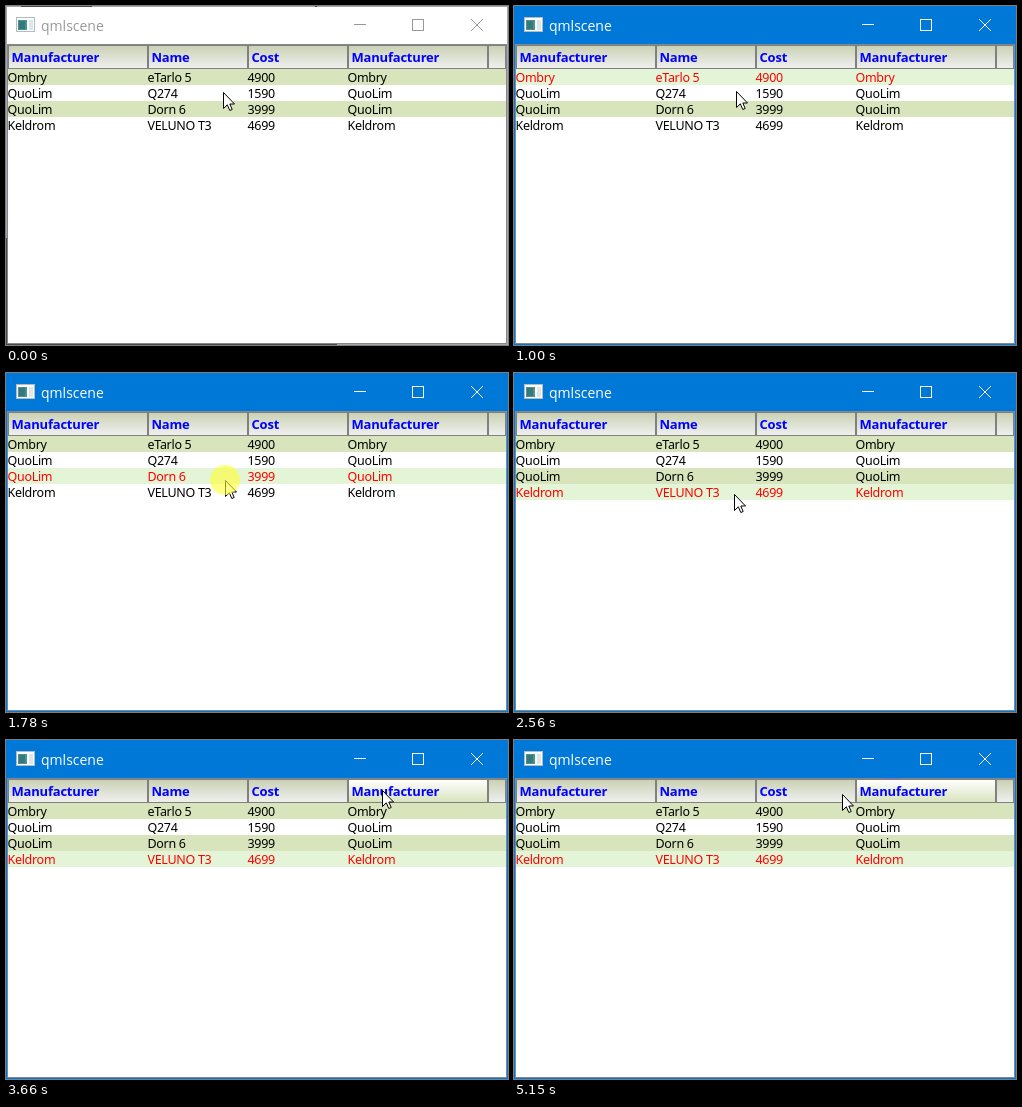
Write an HTML page that moves like this. It is 502 px wide and 339 px high and loops after 5.22 s.

```html
<!DOCTYPE html>
<html lang="en">
<head>
<meta charset="utf-8">
<title>qmlscene</title>
<style>
  html, body { margin: 0; width: 100%; height: 100%; overflow: hidden; background: #fff; }
  svg { display: block; width: 502px; height: 339px; }
  text { white-space: pre; }
  .title { font: 14px "Open Sans", "Noto Sans", sans-serif; }
  .head { font: bold 13px "Noto Sans", "Open Sans", sans-serif; letter-spacing: -.2px; }
  .cell { font: 12.5px "Noto Sans", "Open Sans", sans-serif; letter-spacing: -.3px; }
</style>
</head>
<body>
<svg id="stage" viewBox="0 0 502 339" xmlns="http://www.w3.org/2000/svg">
  <defs>
    <linearGradient id="normal" x2="0" y2="1">
      <stop stop-color="#c9d1b3"/><stop offset="1" stop-color="#f0f0f0"/>
    </linearGradient>
    <linearGradient id="hover" x2="0" y2="1">
      <stop stop-color="#fff"/><stop offset="1" stop-color="#d7e3bc"/>
    </linearGradient>
    <linearGradient id="pressed" x2="0" y2="1">
      <stop stop-color="#d3d8c0"/><stop offset="1" stop-color="#fff"/>
    </linearGradient>
  </defs>
  <rect id="frame" width="502" height="339"/>
  <g id="backdrop" shape-rendering="crispEdges" fill="#4b4543">
    <rect x="15" width="71" height="1"/>
    <rect x="309" width="2" height="1"/>
    <rect y="232" width="1" height="107"/>
    <rect y="338" width="331" height="1"/>
  </g>
  <rect id="bar" x="1" y="1" width="500" height="37"/>
  <g id="icon" shape-rendering="crispEdges">
    <rect x="10" y="11" width="19" height="15" fill="#b4bcc2"/>
    <rect x="11" y="12" width="17" height="13" fill="#fbfcfc"/>
    <rect x="12" y="14" width="9" height="10" fill="#4a9490"/>
    <rect x="13" y="15" width="6" height="8" fill="#37787c"/>
    <rect x="23" y="14" width="4" height="10" fill="#dfe6ea"/>
  </g>
  <text id="caption" class="title" x="35" y="25">qmlscene</text>
  <g id="buttons" fill="none">
    <path d="M348 18.5h12M406.5 13.5h11v11h-11z" shape-rendering="crispEdges"/>
    <path d="M465 13l12 12M477 13l-12 12"/>
  </g>
  <rect x="1.5" y="38.5" width="499" height="299" fill="#fff" stroke="#828790" shape-rendering="crispEdges"/>
  <g id="table"></g>
  <path id="trace" d="M368 38.5h20" stroke="#8b6fc0" shape-rendering="crispEdges"/>
  <path id="cursor" d="M.5.5V16.5L4.3 12.8L6.8 18.5L9.2 17.5L6.8 12H11.5Z" fill="#fff" stroke="#000" stroke-width="1"/>
  <circle id="spot" r="15" fill="#ffff30" fill-opacity=".6"/>
</svg>
<script>
const LOOP = 5220;
const $ = id => document.getElementById(id);
const set = (el, attrs) => {
  for (const name in attrs) el.setAttribute(name, attrs[name]);
};
const add = (tag, attrs, label) => {
  const el = document.createElementNS("http://www.w3.org/2000/svg", tag);
  set(el, attrs);
  if (label) el.textContent = label;
  return $("table").appendChild(el);
};

const columns = [2, 142, 242, 342, 482, 500];
const titles = ["Manufacturer", "Name", "Cost", "Manufacturer", ""];
const phones = [
  ["Ombry", "eTarlo 5", "4900"],
  ["QuoLim", "Q274", "1590"],
  ["QuoLim", "Dorn 6", "3999"],
  ["Keldrom", "VELUNO T3", "4699"]
];

const heads = titles.map((label, i) => ({
  box: add("rect", {
    x: columns[i] + .5, y: 39.5, width: columns[i + 1] - columns[i] - 1, height: 23,
    fill: "url(#normal)", stroke: "#808080", "shape-rendering": "crispEdges"
  }),
  text: add("text", { class: "head", x: columns[i] + 3.5, y: 56, fill: "#00f" }, label)
}));

const rows = phones.map((phone, i) => {
  const y = 63 + 16 * i;
  const band = add("rect", { x: 2, y, width: 498, height: 16 });
  const cells = [...phone, phone[0]].map((label, c) =>
    add("text", { class: "cell", x: columns[c] - .5, y: y + 13 }, label));
  return { band, cells };
});

// Pointer moves: first step, last step, number of steps, end point
const moves = [
  [80, 310, 4, 230, 75],
  [850, 1160, 5, 217, 91],
  [1310, 1310, 1, 217, 94],
  [1390, 1460, 2, 219, 106],
  [1710, 1710, 1, 219, 107],
  [1860, 2170, 5, 220, 119],
  [2240, 2240, 1, 220, 121],
  [2730, 3110, 6, 367, 55],
  [3190, 3190, 1, 369, 54],
  [3260, 3420, 3, 376, 50],
  [3960, 3960, 1, 377, 50],
  [4130, 4210, 2, 378, 51],
  [4910, 5150, 4, 328, 54]
];
const rowClicks = [540, 1240, 1780, 2560];
const rowSpots = [[540, 620], [1240, 1310], [1780, 1860]];
const headPresses = [[3490, 3660], [4360, 4910]];
const during = (spans, t) => spans.some(([from, to]) => t >= from && t < to);

function pointer(t) {
  let x = 217, y = 86;
  for (const [first, last, steps, toX, toY] of moves) {
    if (t < first) break;
    const gap = (last - first) / (steps - 1 || 1) || 1;
    const done = Math.min(steps, Math.floor((t - first) / gap + .15) + 1) / steps;
    x += (toX - x) * done;
    y += (toY - y) * done;
  }
  return [Math.round(x), Math.round(y)];
}

function draw(t) {
  const active = t >= 540;
  const ink = active ? "#fff" : "#999";
  set($("frame"), { fill: active ? "#0078d7" : "#a5a5a5" });
  set($("bar"), { fill: active ? "#0078d7" : "#fff" });
  set($("caption"), { fill: ink });
  set($("buttons"), { stroke: ink });
  set($("backdrop"), { visibility: active ? "hidden" : "visible" });

  const selected = rowClicks.filter(click => t >= click).length - 1;
  rows.forEach(({ band, cells }, i) => {
    const on = i === selected;
    set(band, { fill: on ? "#e3f5d6" : i % 2 ? "#fff" : "#d8e4bc" });
    cells.forEach(cell => set(cell, { fill: on ? "#f00" : "#000" }));
  });

  const pressed = during(headPresses, t);
  const look = pressed ? "pressed" : t >= 3110 ? "hover" : "normal";
  set(heads[3].box, { fill: `url(#${look})` });
  set(heads[3].text, { fill: pressed ? "#ff3b30" : "#00f" });

  const [x, y] = pointer(t);
  set($("cursor"), { transform: `translate(${x} ${y})` });
  set($("spot"), {
    cx: x, cy: y,
    visibility: pressed || during(rowSpots, t) ? "visible" : "hidden"
  });
  set($("trace"), { visibility: t >= 4910 ? "visible" : "hidden" });
}

const start = performance.now();
function tick() {
  draw((performance.now() - start) % LOOP);
  requestAnimationFrame(tick);
}
tick();
</script>
</body>
</html>
```
